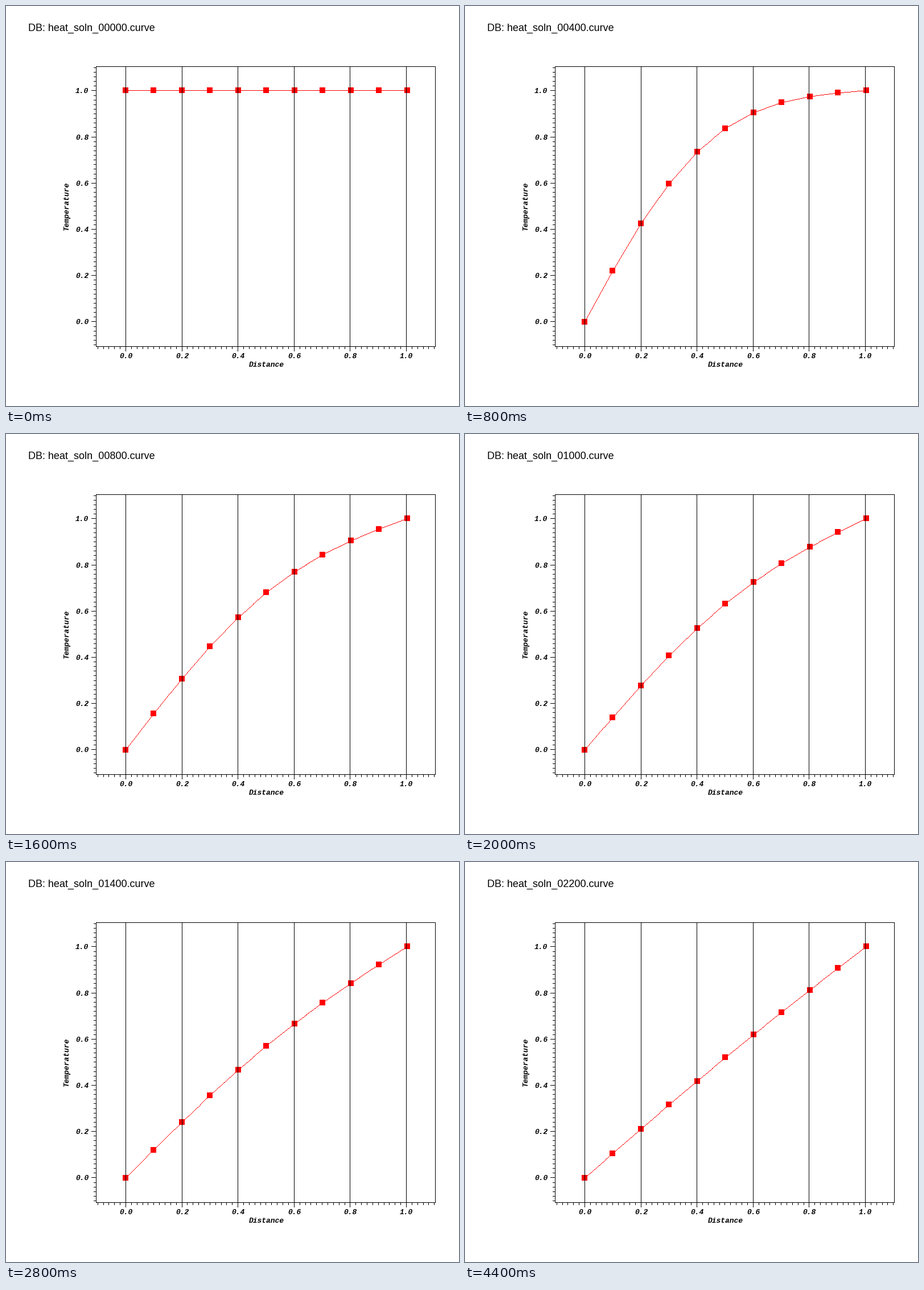
These frames come from a looping animation (796x703 px, 4600 ms). A matplotlib script:

```python
import numpy as np
import matplotlib.pyplot as plt
from matplotlib.animation import FuncAnimation
from matplotlib.collections import PolyCollection

W, H, DPI = 796, 703, 64
FRAMES, INTERVAL = 23, 200
STEPS = 100          # solver steps per frame
R = 0.016            # diffusion number per step
PX = 72 / DPI        # one pixel in points

LEFT, RIGHT, TOP, BOTTOM = 158, 754, 106, 598
SIDE = 10            # marker size
RED = "#ff0000"


def solve():
    """Explicit heat solution on 11 nodes, saved once per frame."""
    u = np.ones(11)
    saved = [u.copy()]
    u[0] = 0
    for _ in range(FRAMES - 1):
        for _ in range(STEPS):
            u[1:-1] += R * (u[2:] - 2 * u[1:-1] + u[:-2])
        saved.append(u.copy())
    return saved


def box(x, y, w=1, h=1):
    return [(x, y), (x + w, y), (x + w, y + h), (x, y + h)]


def hline(x0, x1, y):
    return box(x0, y, x1 - x0 + 1, 1)


def vline(x, y0, y1):
    return box(x, y0, 1, y1 - y0 + 1)


def trace(xs, ys):
    """One-pixel-wide polyline as a list of pixel squares."""
    cells = []
    for x0, y0, x1, y1 in zip(xs, ys, xs[1:], ys[1:]):
        n = int(np.ceil(max(abs(x1 - x0), abs(y1 - y0)))) + 1
        px = np.floor(np.linspace(x0, x1, n))
        py = np.floor(np.linspace(y0, y1, n))
        cells += [box(x, y) for x, y in zip(px, py)]
    return cells


fig = plt.figure(figsize=(W / DPI, H / DPI), dpi=DPI, facecolor="white")
ax = fig.add_axes([0, 0, 1, 1])
ax.set_xlim(0, W)
ax.set_ylim(H, 0)
ax.axis("off")


def layer(boxes, color, z):
    shapes = PolyCollection(boxes, facecolors=color, edgecolors="none",
                            linewidths=0, antialiaseds=False, zorder=z)
    ax.add_collection(shapes, autolim=False)
    return shapes


def label(x, y, text, ha="center", rotation=0):
    ax.text(x, y, text, family="Liberation Mono", weight="bold",
            style="italic", size=13 * PX, ha=ha, va="baseline",
            rotation=rotation, rotation_mode="anchor")


# Frame, grid and ticks
lines = [hline(LEFT, RIGHT, TOP), hline(LEFT, RIGHT, BOTTOM),
         vline(LEFT, TOP, BOTTOM), vline(RIGHT, TOP, BOTTOM)]
for i in range(-5, 56):
    v = i / 50
    x, y = round(210 + 493 * v), round(554.4 - 406 * v)
    major = i % 10 == 0
    lines.append(vline(x, TOP if major else BOTTOM, 606 if major else 602))
    lines.append(hline(150 if major else 154, LEFT, y))
    if major:
        label(x + 0.7, 619, f"{v:.1f}")
        label(145.3, y + 4.7, f"{v:.1f}", ha="right")
layer(lines, "black", 6)

label(458, 634, "Distance")
label(109.5, 351, "Temperature", rotation=90)
title = ax.text(38.6, 43.5, "", family="Liberation Sans", size=18 * PX,
                va="baseline")

# Curve
nodes_x = 210.4 + 494.7 * np.linspace(0, 1, 11)
curve = layer([], RED, 4)
marks = layer([], RED, 5)
states = solve()


def draw(n):
    nodes_y = 555.6 - 407 * states[n]
    curve.set_verts(trace(nodes_x, nodes_y))
    corners = zip(np.floor(nodes_x) - SIDE / 2, np.floor(nodes_y) - SIDE / 2)
    marks.set_verts([box(x, y, SIDE, SIDE) for x, y in corners])
    title.set_text(f"DB: heat_soln_{n * STEPS:05d}.curve")
    return [curve, marks, title]


anim = FuncAnimation(fig, draw, frames=FRAMES, interval=INTERVAL,
                     repeat=True, repeat_delay=0)
plt.show()
```
